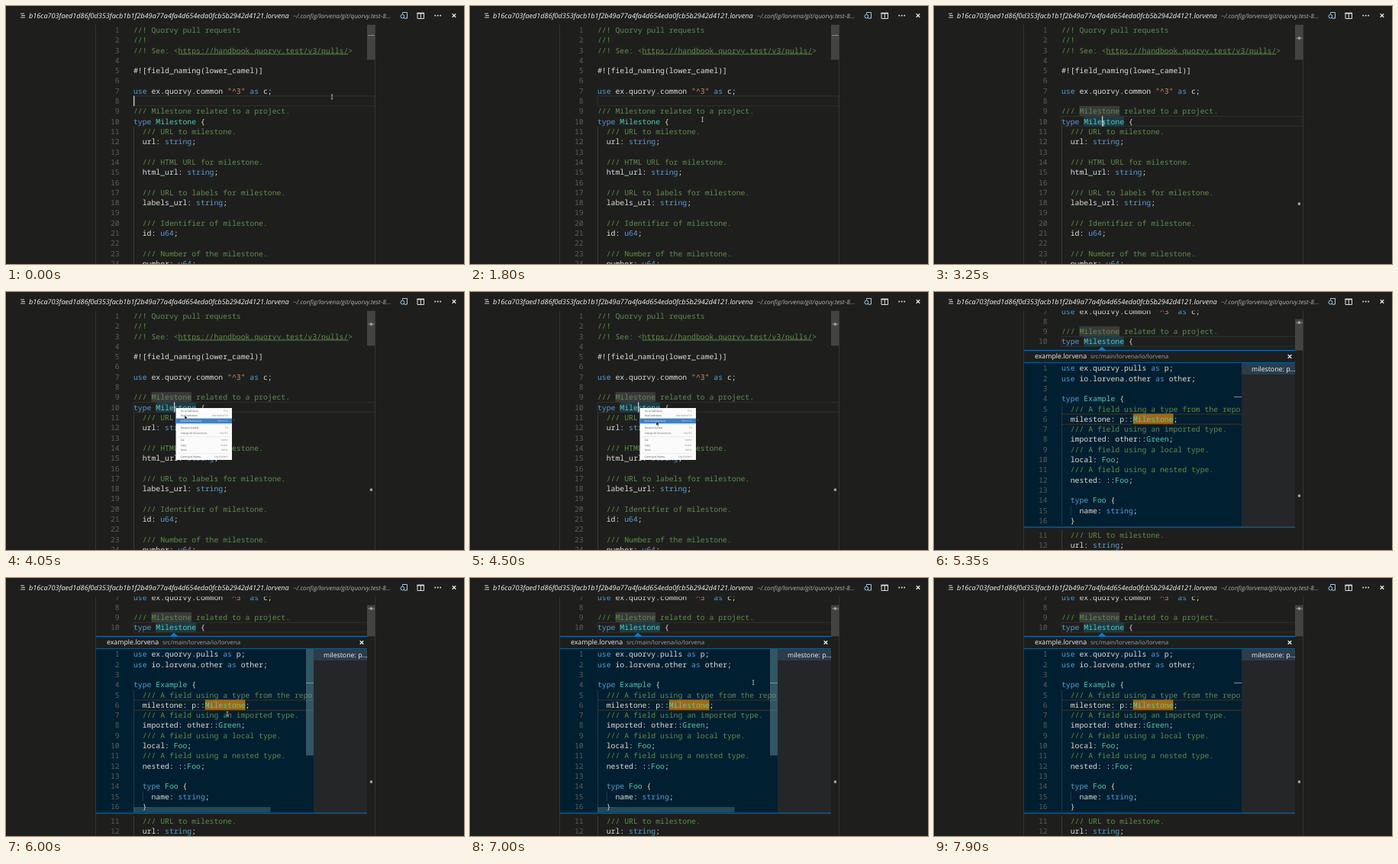
An HTML page for the animation above (8000 ms loop, 600 by 338 pixels).

```html
<!DOCTYPE html>
<html>
<head>
<meta charset="utf-8">
<style>
html, body { margin: 0; width: 100%; height: 100%; overflow: hidden; background: #1e1f1c; }
svg { display: block; width: 600px; height: 338px; }
text { white-space: pre; text-rendering: geometricPrecision; }
.code { font: 9.77px "Noto Sans Mono", "DejaVu Sans Mono", monospace; fill: #dcdcd6; }
.ui { font: 8.8px "Open Sans", "Noto Sans", sans-serif; fill: #f2f2f2; }
.menu { font: 3.15px "Open Sans", "Noto Sans", sans-serif; fill: #444; }
.num { fill: #5c5d5a; text-anchor: end; }
.rem { fill: #608b4e; }
.key { fill: #569cd6; }
.type { fill: #4ec9b0; }
.str { fill: #ce9178; }
.link { text-decoration: underline; }
</style>
</head>
<body>
<svg id="stage" viewBox="0 0 600 338"></svg>
<script>
const LOOP = 8000, LINE = 13.31, CHAR = 5.86, LEFT = 167;
const TOP = 24.5, PEEK_TOP = 92.9;

const mainCode = `//! Quorvy pull requests
//!
//! See: <https://handbook.quorvy.test/v3/pulls/>

#![field_naming(lower_camel)]

use ex.quorvy.common "^3" as c;

/// Milestone related to a project.
type Milestone {
  /// URL to milestone.
  url: string;

  /// HTML URL for milestone.
  html_url: string;

  /// URL to labels for milestone.
  labels_url: string;

  /// Identifier of milestone.
  id: u64;

  /// Number of the milestone.
  number: u64;`.split('\n');

const peekCode = `use ex.quorvy.pulls as p;
use io.lorvena.other as other;

type Example {
  /// A field using a type from the repo
  milestone: p::Milestone;
  /// A field using an imported type.
  imported: other::Green;
  /// A field using a local type.
  local: Foo;
  /// A field using a nested type.
  nested: ::Foo;

  type Foo {
    name: string;
  }`.split('\n');

const esc = s => s.replace(/</g, '&lt;').replace(/>/g, '&gt;');
const span = (cls, s) => `<tspan class="${cls}">${s}</tspan>`;
const rect = (x, y, w, h, fill, extra = '') =>
  `<rect x="${x}" y="${y}" width="${w}" height="${h}" fill="${fill}" ${extra}/>`;
const path = (d, stroke, extra = '') =>
  `<path d="${d}" stroke="${stroke}" fill="none" ${extra}/>`;
const label = (x, y, s, cls = 'ui', extra = '') =>
  `<text x="${x}" y="${y}" class="${cls}" ${extra}>${s}</text>`;

function paint(line) {
  if (/^\s*\/\//.test(line))
    return span('rem', esc(line).replace(/https:[^&]+/, url => span('link', url)));
  return line.replace(/"[^"]*"|\b(use|as|type|string|u64)\b|\b[A-Z]\w*/g, (word, key) =>
    span(word[0] === '"' ? 'str' : key ? 'key' : 'type', word));
}

// Code rows with their line numbers, from index a up to b
function rows(lines, top, a = 0, b = lines.length) {
  let out = '';
  for (let i = a; i < b; i++) {
    const y = top + i * LINE + 10.4;
    out += label(148.6, y, i + 1, 'code num') + label(LEFT, y, paint(lines[i]), 'code');
  }
  return out;
}

const guide = (x, top, a, b, color) => rect(x, top + a * LINE, .8, (b - a) * LINE, color);
const wordBox = (col, row, top, color) =>
  rect(LEFT + col * CHAR, top + row * LINE, 9 * CHAR, LINE, color);
const cross = (x, y) => path(`M${x - 2.3} ${y - 2.3}l4.6 4.6m0-4.6l-4.6 4.6`, '#eee', 'stroke-width="1.3"');

const titleBar =
  path('M19 10h5M20 12.5h5M19 15h6', '#ccc') +
  label(30, 15.6, 'b16ca703faed1d86f0d353facb1b1f2b49a77a4fa4d654eda0fcb5b2942d4121.lorvena', 'ui',
    'style="font-style:italic;font-size:9.12px"') +
  label(376, 15.6, '~/.config/lorvena/git/quorvy.test-8...', 'ui',
    'style="font-style:italic;font-size:8.16px;fill:#b0b0ae"') +
  path('M519.5 10.5V8.5h6v7.5h-2.5', '#9ccbf0') +
  path('M521 15l2 2', '#9ccbf0') +
  '<circle cx="519.4" cy="13.6" r="2.4" fill="none" stroke="#9ccbf0"/>' +
  path('M538.5 9.5h9.5', '#ddd', 'stroke-width="1.8"') +
  path('M539 9v7.5h8.5V9M543.3 9v7.5', '#ddd') +
  [562.2, 565.7, 569.2].map(x => `<circle cx="${x}" cy="12.4" r="1" fill="#ddd"/>`).join('') +
  cross(587, 12.4);

const menuItems = [
  [155.6, 'Go to Definition', 'F12'], [162.3, 'Peek Definition', 'Ctrl+Shift+F10'],
  [169, 'Find All References', 'Shift+F12'], [177.8, 'Rename Symbol', 'F2'],
  [184.4, 'Change All Occurrences', 'Ctrl+F2'], [193.8, 'Cut', 'Ctrl+X'],
  [200.4, 'Copy', 'Ctrl+C'], [207, 'Paste', 'Ctrl+V'],
  [216, 'Command Palette...', 'Ctrl+Shift+P']];

const menu = rect(222.5, 152, 73.5, 68, '#fbfbfb') +
  '<rect id="hover" x="222.5" width="73.5" height="6.7" fill="#3b82c8"/>' +
  [173.4, 189.2, 211.6].map(y => rect(224, y, 70.5, .5, '#ddd')).join('') +
  menuItems.map(([y, name, keys]) => `<g class="item">${label(228.7, y + 1.1, name, 'menu')}` +
    `${label(290.5, y + 1.1, keys, 'menu', 'text-anchor="end" opacity=".75"')}</g>`).join('');

const peek = rect(118, 76, 355, 232, '#1e1f1c') +
  rect(118, 93, 285, 215, '#001f30') + rect(403, 93, 70, 215, '#252627') +
  rect(403, 93, 70, 15, '#2b3c4b') +
  label(132, 87.3, 'example.lorvena') +
  label(205, 87.3, 'src/main/lorvena/io/lorvena', 'ui', 'style="font-size:7.85px;fill:#a0a09e"') +
  cross(466, 84.5) + label(416, 103.8, 'milestone: p...') +
  rect(LEFT, PEEK_TOP + 5 * LINE, 236, 1, '#46331f') + rect(LEFT, PEEK_TOP + 6 * LINE, 236, 1, '#46331f') +
  guide(167, PEEK_TOP, 4, 16, '#23404c') + guide(178.8, PEEK_TOP, 14, 15, '#23404c') +
  wordBox(16, 5, PEEK_TOP, '#a3690e') +
  `<g clip-path="url(#peekClip)">${rows(peekCode, PEEK_TOP)}</g>` +
  `<g id="bars">${rect(393, 93, 10, 139.5, '#6f9aa0', 'fill-opacity=".45"')}` +
  `${rect(167, 300, 179.5, 7, '#6f9aa0', 'fill-opacity=".33"')}</g>` +
  rect(393, 137, 10, 1, '#7e959a') +
  rect(118, 76, 355, 1, '#007acc') + rect(118, 92, 355, 1, '#006099') + rect(118, 307.6, 355, 1, '#007acc') +
  '<path d="M215 76l5-4.5 5 4.5z" fill="#007acc"/>';

document.getElementById('stage').innerHTML = `
<clipPath id="body"><rect x="117" y="24.5" width="368" height="314"/></clipPath>
<clipPath id="peekClip"><rect x="118" y="93" width="285" height="214"/></clipPath>
${rect(0, 0, 600, 338, '#1e1f1c')}${titleBar}
<g clip-path="url(#body)">
  ${rect(117, 24, 1, 314, '#353633')}${rect(483, 24, 1, 314, '#353633')}
  <g id="upper">
    <rect id="current" x="167" width="316" height="12.8" fill="none" stroke="#30312e"/>
    <g id="words">${wordBox(4, 8, TOP, '#393a3a')}${wordBox(5, 9, TOP, '#1d3b46')}</g>
    ${rows(mainCode, TOP, 0, 10)}
    <rect id="caret" width="1.4" height="13.3" fill="#c4c5c2"/>
  </g>
  <g id="lower">${guide(167, TOP, 10, 24, '#41423f')}${rows(mainCode, TOP, 10)}</g>
  <rect id="slider" x="473" width="10.5" fill="#434441"/>
  <rect id="mark" x="474" width="9" height="1" fill="#888985"/>
  <g id="hits" fill="#a3a4a0"><rect id="hitA" x="476.8" width="3.2" height="3.2"/>
    <rect id="hitB" x="476.8" width="3.2" height="3.2"/></g>
</g>
<g id="peek">${peek}</g>
<g id="menu">${menu}</g>
<g id="beam">${path('M-1.2-2.8h2.4M0-2.8v5.6M-1.2 2.8h2.4', '#c8c8c4', 'stroke-width=".8"')}</g>
<path id="arrow" d="M0 0v5.6l1.3-1.2.9 2 1-.4-.9-2h1.8z" fill="#111" stroke="#fff" stroke-width=".4"/>`;

const el = {};
document.querySelectorAll('#stage [id]').forEach(e => el[e.id] = e);
const items = document.querySelectorAll('.item');
const set = (id, name, value) => el[id].setAttribute(name, value);
const show = (id, on) => set(id, 'visibility', on ? 'visible' : 'hidden');
const between = (t, a, b) => t >= a && t < b;
const ramp = (t, a, b) => Math.min(1, Math.max(0, (t - a) / (b - a)));

// Pointer stops: time, x, y
const stops = [
  [0, 427, 119], [1450, 427, 119], [1900, 270, 157], [2250, 219, 152], [2750, 219, 152],
  [2900, 236, 150], [3100, 217, 147], [3200, 217, 147], [3250, 222, 154], [3900, 222, 154],
  [4050, 234, 161.5], [4500, 244, 169.5], [5250, 244, 172.5], [5400, 244, 172.5],
  [5850, 290, 178], [6150, 290, 178], [6550, 350, 150], [7000, 371, 137],
  [7200, 388, 128], [7650, 460, 101], [LOOP, 460, 101]];

function pointer(t) {
  const i = stops.findIndex(s => s[0] > t);
  const [t0, x0, y0] = stops[i - 1], [t1, x1, y1] = stops[i];
  const k = ramp(t, t0, t1);
  return [x0 + (x1 - x0) * k, y0 + (y1 - y0) * k];
}

function draw(t) {
  const clicked = t >= 2250, marked = t >= 2550, open = t >= 5350;
  const inMenu = between(t, 3550, 5250);
  const row = clicked ? 9 : 7;

  set('upper', 'transform', `translate(0 ${open ? -86.2 : 0})`);
  set('lower', 'transform', `translate(0 ${open ? 153.8 : 0})`);
  set('current', 'y', TOP + row * LINE + .2);
  set('caret', 'x', clicked ? 219.9 : 167);
  set('caret', 'y', TOP + row * LINE);
  show('words', marked);
  show('caret', t < 450 || between(t, 950, 1450) || between(t, 1950, 2750) || between(t, 3250, 5350));

  set('slider', 'y', open ? 35.5 : 24.3);
  set('slider', 'height', open ? 41 : 46);
  const markY = open ? 39.6 : clicked ? 41.6 : 38;
  set('mark', 'y', markY);
  set('hitA', 'y', markY - 1.1);
  set('hitB', 'y', open ? 265.4 : 257.5);
  show('hits', marked);

  show('peek', open);
  set('bars', 'opacity', ramp(t, 5400, 5500) * (1 - ramp(t, 7100, 7900)));

  const pick = t < 3900 ? -1 : t < 3950 ? 0 : t < 4000 ? 1 : 2;
  show('menu', inMenu);
  show('hover', inMenu && pick >= 0);
  if (pick >= 0) set('hover', 'y', menuItems[pick][0] - 3.4);
  items.forEach((g, i) => g.querySelectorAll('text').forEach(e => e.style.fill = i === pick ? '#fff' : ''));

  // The pointer blinks out while the panel opens
  const [x, y] = pointer(t), onList = x > 403 && t > 7000;
  for (const id of ['beam', 'arrow']) set(id, 'transform', `translate(${x} ${y})`);
  show('beam', !inMenu && !onList && !between(t, 5350, 5400));
  show('arrow', inMenu || (onList && t < 7650));
}

const start = performance.now();
function tick() {
  draw((performance.now() - start) % LOOP);
  requestAnimationFrame(tick);
}
tick();
</script>
</body>
</html>
```
